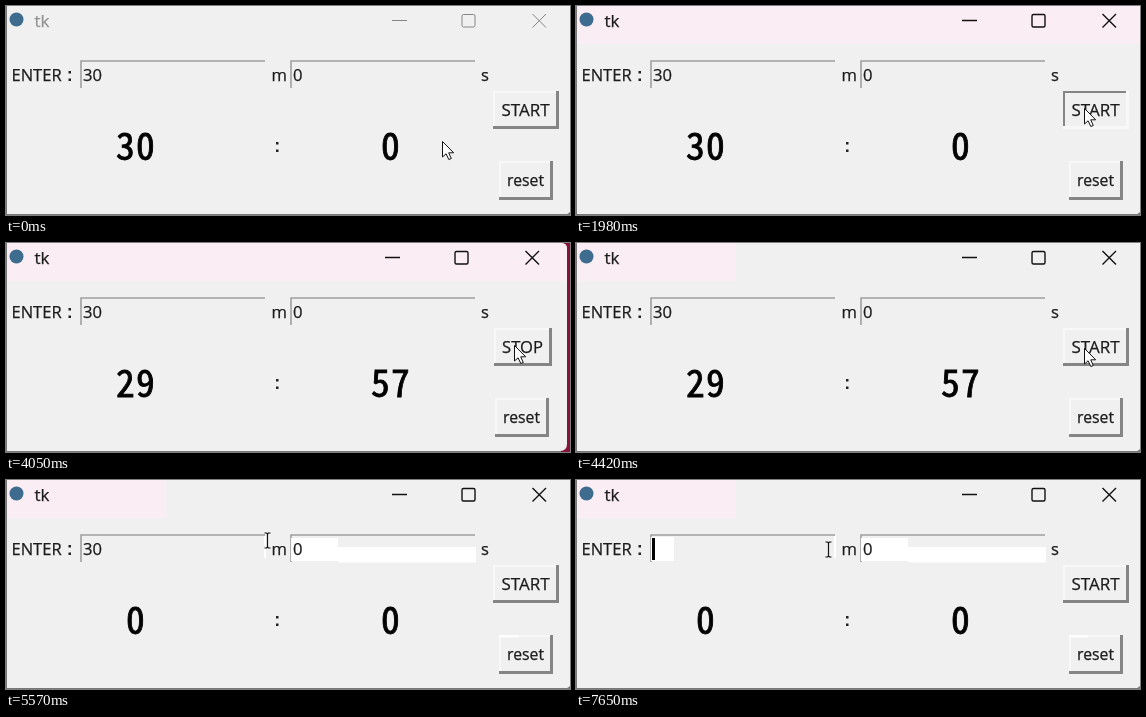
These frames come from a looping animation (564x209 px, 8 s). An HTML page:

```html
<!DOCTYPE html>
<html lang="en">
<head>
<meta charset="utf-8">
<title>Countdown timer</title>
<style>
html, body { margin: 0; width: 564px; height: 209px; overflow: hidden; background: #f0f0f0; }
svg { display: block; }
text { font: 16.6px "Open Sans", "Noto Sans", sans-serif; fill: #1c1c1c; stroke: #1c1c1c; stroke-width: .25px; }
.mid { text-anchor: middle; }
.big { font: 37.5px "Noto Sans Mono CJK JP", "Noto Sans CJK JP", sans-serif; letter-spacing: 1.3px; fill: #000; stroke: #000; stroke-width: .8px; }
</style>
</head>
<body>
<svg id="stage" width="564" height="209" viewBox="0 0 564 209"></svg>
<script>
const LOOP = 8000;
const stage = document.getElementById('stage');

// Pointer steps: first time, last time, step count, end point.
const moves = [
  [800, 1010, 4, 457, 117],
  [1460, 1460, 1, 464, 110],
  [1530, 1830, 5, 508, 102],
  [4360, 4360, 1, 508, 105],
  [4540, 4960, 7, 515, 170],
  [5200, 5340, 3, 458, 84],
  [5410, 5490, 2, 308, 69],
  [5570, 5570, 1, 261, 60],
  [5720, 5720, 1, 252, 69]
];

function pointerAt(t) {
  let x = 436, y = 135;
  for (const [start, end, steps, toX, toY] of moves) {
    if (t < start) break;
    const gap = steps > 1 ? (end - start) / (steps - 1) : 1;
    const part = Math.min(steps, Math.floor((t - start) / gap + 1e-6) + 1) / steps;
    x += (toX - x) * part;
    y += (toY - y) * part;
  }
  return [Math.round(x), Math.round(y)];
}

const within = (t, a, b) => t >= a && t < b;
const rect = (x, y, w, h, fill) => `<rect x="${x}" y="${y}" width="${w}" height="${h}" fill="${fill}"/>`;
const path = (d, stroke, width = 1, fill = 'none') =>
  `<path d="${d}" stroke="${stroke}" stroke-width="${width}" fill="${fill}"/>`;
const label = (x, y, s, attrs = '') => `<text x="${x}" y="${y}" ${attrs}>${s}</text>`;
const big = (x, s) => label(x, 153.5, s, 'class="mid big"');
const dots = (x, y) => rect(x, y, 2.5, 2.5, '#222') + rect(x, y + 7.5, 2.5, 2.5, '#222');

function button(x, y, w, h, name, size, pressed) {
  const [light, dark] = pressed ? ['#858585', '#f8f8f8'] : ['#f8f8f8', '#858585'];
  return rect(x, y, w, h, '#f0f0f0') +
    path(`M${x + 1} ${y + h - 1}V${y + 1}H${x + w - 1}`, light, 2) +
    path(`M${x} ${y + h - 1.5}H${x + w - 1.5}V${y}`, dark, 3) +
    label(x + w / 2 - .5, y + h / 2 + 5.5, name, `class="mid" style="font-size:${size}px"`);
}

const entry = x => path(`M${x + 1} 82V55H${x + 185}`, '#a0a0a0', 1.6);

function titleBar(active, narrow) {
  const shift = narrow ? -7 : 0;
  const ink = active ? '#111' : '#858585';
  const width = active ? 1.4 : 1;
  const tone = active ? '#1c1c1c' : '#929292';
  return `<circle cx="10.5" cy="13.5" r="7" fill="#3d6c8e"/>` +
    label(28.5, 21, 'tk', `style="font-size:17px;fill:${tone};stroke:${tone}"`) +
    `<g transform="translate(${shift})">` +
    path('M386 14.5H401M526.5 8L540 21.5M540 8L526.5 21.5', ink, width) +
    `<rect x="456" y="8.5" width="13" height="12.5" rx="1.5" fill="none" stroke="${ink}" stroke-width="${width}"/></g>`;
}

function pointer(t) {
  const [x, y] = pointerAt(t);
  const shape = t >= 5410
    ? path('M-3 -7.5H-1L0 -6.5L1 -7.5H3M0 -7V7M-3 7.5H-1L0 6.5L1 7.5H3', '#111', 1.2)
    : path('M0 0V15.5L3.6 12.3L6.3 18L8.8 17L6.2 11.3H11.2Z', '#111', 1, '#fff');
  return `<g transform="translate(${x + .5} ${y + .5})">${shape}</g>`;
}

// Repainted areas inside the entries.
function patches(t) {
  let s = '';
  if (t >= 5410) s += rect(332, 67, 138, 15.5, '#fff');
  if (t >= 5490) s += rect(285, 58, 47, 23, '#fff');
  if (t >= 5570) s += rect(258, 56, 2, 22, '#fff');
  if (t >= 5870) {
    const left = t < 7010 ? 93 : t < 7160 ? 84 : 75;
    s += rect(left, 57, 98 - left, 24, '#fff');
  }
  return s;
}

function caret(t) {
  if (t < 5870 || within(t, 6460, 6800) || within(t, 7390, 7650)) return '';
  const x = t < 7010 ? 94 : t < 7160 ? 85 : 76;
  return rect(x, 58, 3, 22, '#000');
}

// Window frame and title bar background; the window is narrower while running.
function frame(active, running, pinkWidth) {
  const edge = rect(0, 0, 1, 209, '#777');
  if (running) {
    return rect(0, 0, 564, 209, '#85143a') +
      '<path d="M0 0H555Q561 0 561 6V201Q561 208 554 208H0Z" fill="#f0f0f0"/>' +
      '<path d="M0 0H555Q561 0 561 6V38H0Z" fill="#faedf3"/>' +
      rect(0, 208, 555, 1, '#777') + edge;
  }
  return rect(0, 0, 564, 209, '#f0f0f0') +
    (active ? rect(0, 0, pinkWidth, 38, '#faedf3') : '') +
    path('M564 206V209H560Z', 'none', 0, '#777') +
    rect(0, 208, 564, 1, '#777') + edge;
}

function scene(t) {
  const active = t >= 1980;
  const running = within(t, 2050, 4360);
  const wasReset = t >= 5200;
  const elapsed = t < 2050 ? 0 : Math.min(3, Math.floor((t - 2050) / 1000) + 1);
  const left = wasReset ? 0 : 1800 - elapsed;
  const typed = t < 7010 ? '30' : t < 7160 ? '3' : '';
  let s = frame(active, running, t < 2050 ? 564 : 160) + titleBar(active, running);
  s += entry(74) + entry(284) + patches(t);
  s += label(5.5, 75, 'ENTER', 'style="font-size:16.5px"') + dots(62.5, 65);
  s += label(77, 75, typed) + label(287, 75, '0');
  s += label(265.5, 75, 'm') + label(475, 75, 's');
  s += big(130, Math.floor(left / 60)) + dots(270, 136) + big(385, left % 60);
  s += running
    ? button(488, 85, 58, 38, 'STOP', 16.6, t >= 4300) + button(489, 155, 54, 39, 'reset', 15.8)
    : button(487, 85, 66, 38, 'START', 17, within(t, 1980, 2050)) +
      button(493, 155, 54, 39, 'reset', 15.8, within(t, 5110, 5200));
  if (wasReset) s += rect(493, 155, 19, 2.5, '#fff');
  return s + caret(t) + pointer(t);
}

let shown = '';
function draw() {
  const next = scene(performance.now() % LOOP);
  if (next !== shown) stage.innerHTML = shown = next;
  requestAnimationFrame(draw);
}
draw();
</script>
</body>
</html>
```
